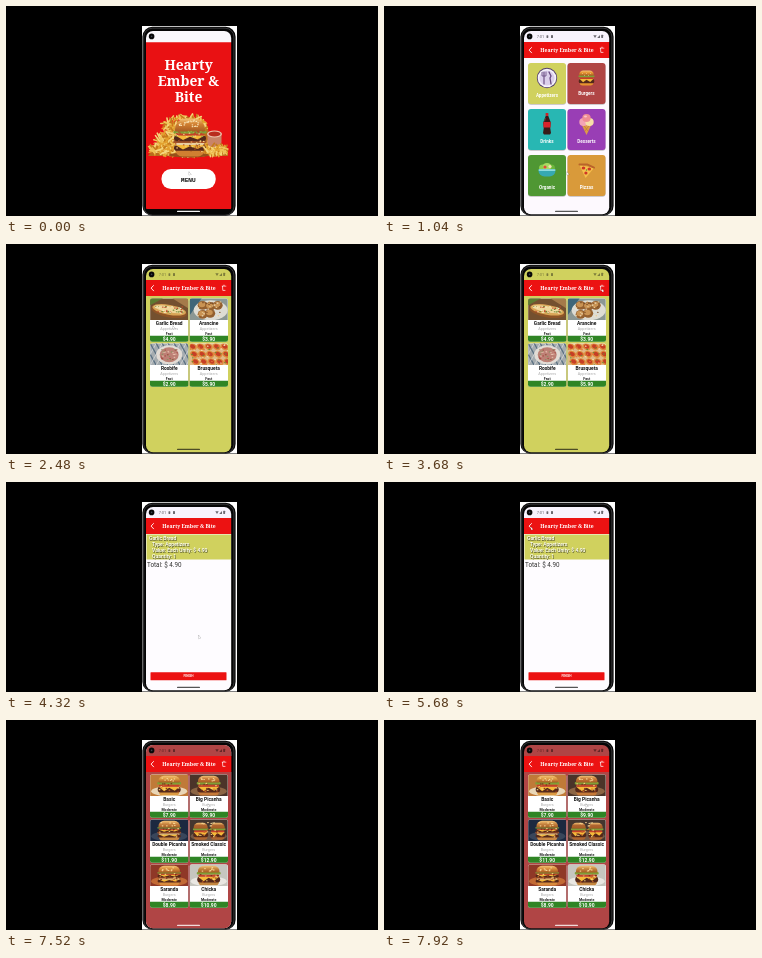
An HTML page with a canvas that plays this animation: 372 px wide and 210 px high, repeating every 8000 ms.

```html
<!DOCTYPE html>
<html lang="en">
<head>
<meta charset="utf-8">
<title>Food ordering app</title>
<style>
html, body { margin: 0; width: 100%; height: 100%; overflow: hidden; background: #000; }
canvas { display: block; width: 372px; height: 210px; }
</style>
</head>
<body>
<canvas id="stage"></canvas>
<script>
const W = 372, H = 210, LOOP = 8000, FADE = 180;
const SANS = 'Roboto, "Open Sans", sans-serif', SERIF = '"Noto Serif", serif';
const RED = '#ec1212', PAPER = '#fdf9fe', LIME = '#d0d15e', BRICK = '#b04545';
const scale = Math.max(1, window.devicePixelRatio || 1);
let g;

function sheet(canvas) {
  canvas.width = W * scale;
  canvas.height = H * scale;
  const ctx = canvas.getContext('2d');
  ctx.scale(scale, scale);
  return ctx;
}

function seeded(seed) {
  return () => (seed = (seed * 16807) % 2147483647) / 2147483647;
}

function rect(x, y, w, h, fill, r = 0) {
  g.fillStyle = fill;
  g.beginPath();
  g.roundRect(x, y, w, h, r);
  g.fill();
}

function oval(x, y, rx, ry, fill, turn = 0) {
  g.fillStyle = fill;
  g.beginPath();
  g.ellipse(x, y, rx, ry, turn, 0, Math.PI * 2);
  g.fill();
}

function poly(fill, ...p) {
  g.fillStyle = fill;
  g.beginPath();
  for (let i = 0; i < p.length; i += 2) g.lineTo(p[i], p[i + 1]);
  g.fill();
}

function line(color, width, ...p) {
  g.strokeStyle = color;
  g.lineWidth = width;
  g.lineCap = g.lineJoin = 'round';
  g.beginPath();
  for (let i = 0; i < p.length; i += 2) g.lineTo(p[i], p[i + 1]);
  g.stroke();
}

function text(s, x, y, size, color, weight = 400, family = SANS, align = 'center') {
  g.font = `${weight} ${size}px ${family}`;
  g.textAlign = align;
  g.fillStyle = color;
  g.fillText(s, x, y);
}

function clipped(x, y, w, h, r, draw) {
  g.save();
  g.beginPath();
  g.roundRect(x, y, w, h, r);
  g.clip();
  draw();
  g.restore();
}

function flecks(x, y, w, h, tones, count, seed) {
  const rnd = seeded(seed * 991);
  for (let i = 0; i < count; i++) oval(x + rnd() * w, y + rnd() * h, .9, .6, tones[i % tones.length]);
}

// x, y is the centre
function burger(x, y, w, h, bun = '#d98a35', stack = 1) {
  const l = x - w / 2, t = y - h / 2, top = h * .34, base = h * .16;
  const step = (h - top - base) / stack;
  rect(l + w * .06, t + h - base - 1, w * .88, base + 1, bun, [1, 1, base, base]);
  for (let i = stack - 1; i >= 0; i--) {
    const y0 = t + top + i * step;
    rect(l, y0 + step * .45, w, step * .58, '#54281a', step * .25);
    poly('#f4b93a', l + w * .03, y0 + step * .4, l + w * .97, y0 + step * .4, l + w * .74, y0 + step * .85,
      l + w * .5, y0 + step * .55, l + w * .28, y0 + step * .9);
    rect(l + w * .05, y0 + step * .2, w * .9, step * .24, i ? '#e8cfa2' : '#c5402a', 1);
    rect(l - w * .02, y0 - step * .05, w * 1.04, step * .26, i ? '#a4552b' : '#7f9f37', 1);
  }
  const shine = g.createLinearGradient(0, t, 0, t + top);
  shine.addColorStop(0, '#f3c274');
  shine.addColorStop(.45, bun);
  shine.addColorStop(1, '#a65b22');
  rect(l + w * .03, t, w * .94, top, shine, [top * .85, top * .85, 1, 1]);
}

function chips(x, y, rx, ry, count, seed) {
  const rnd = seeded(seed), tones = ['#e2a02e', '#efc258', '#c57a1c', '#f5d67c'];
  for (let i = 0; i < count; i++) {
    const a = rnd() * 6.28, d = Math.sqrt(rnd()), turn = rnd() * 3.14;
    const px = x + Math.cos(a) * d * rx, py = y + Math.sin(a) * d * ry;
    const dx = Math.cos(turn) * 3.6, dy = Math.sin(turn) * 3.6;
    line(tones[i % 4], 1.6, px - dx, py - dy, px + dx, py + dy);
  }
}

function statusBar(color, ink) {
  rect(140, 25, 86, 11.2, color);
  if (!ink) return;
  text('7:01', 156.5, 32, 4, ink);
  rect(162.5, 29.3, 1.8, 2.6, ink, .4);
  rect(167, 29, 2, 3, ink, .6);
  poly(ink, 209.3, 29.2, 212.7, 29.2, 211, 32);
  poly(ink, 213.2, 32, 216, 32, 216, 29);
  rect(217.2, 28.8, 1.9, 3.2, ink, .4);
}

function appBar(cart) {
  rect(140, 36, 86, 16, RED);
  line('#fff', .9, 147.6, 41.4, 145.1, 44.1, 147.6, 46.8);
  text('Hearty Ember & Bite', 183, 46, 5.1, '#fff', 600, SERIF);
  if (!cart) return;
  line('#fff', .6, 215.9, 42.2, 219.9, 42.2);
  line('#fff', .7, 219, 46.4, 216.8, 46.4, 216.5, 42.4);
  line('#fff', .5, 217.2, 41.3, 218.7, 41.3);
}

function handle(color) {
  rect(171, 204.8, 23, 1.2, color, .6);
}

function home() {
  rect(140, 25, 86, 184, '#e91113');
  statusBar('#faf8fc');
  ['Hearty', 'Ember &', 'Bite'].forEach((s, i) => text(s, 182.5, 64 + i * 16, 13.8, '#fff', 700, SERIF));
  poly('#b96d1c', 142, 150, 150, 140, 164, 122, 180, 110, 200, 116, 204, 130, 222, 143, 222, 150);
  chips(179, 119, 21, 9, 110, 9);
  chips(163, 135, 12, 9, 70, 71);
  chips(182, 143, 38, 6, 190, 27);
  oval(183, 149, 20, 2.5, '#94501a');
  burger(184, 131.5, 32, 38, '#d07f31', 2);
  flecks(173, 114, 21, 7, ['#f9e3b4'], 22, 5);
  flecks(168, 125, 32, 6, ['#93b544', '#c23b28', '#f0cf8c'], 26, 12);
  flecks(168, 133, 32, 13, ['#7a351c', '#f7d27b', '#b4491f'], 34, 6);
  rect(201.5, 128, 14, 13, '#c98468', [1, 1, 5, 5]);
  oval(208.5, 128, 7.5, 3.5, '#ecc4ae');
  oval(208.5, 128, 6, 2.5, '#b82c1e');
  chips(209, 144, 11, 4, 34, 44);
  rect(155.5, 163, 54.2, 20, '#fff', 9.5);
  text('MENU', 182.3, 175.6, 6, '#151515', 700, '"Noto Sans Mono", monospace');
  rect(140, 203, 86, 6, '#050505');
  handle('#f5f5f5');
}

const icons = [
  (x, y) => {
    oval(x, y, 10.2, 10.2, '#55406f');
    oval(x, y, 9.3, 9.3, '#f6f2fb');
    oval(x, y, 7.6, 7.6, '#dcd0ec');
    line('#65477f', 1.1, x - 3, y - 6, x - 3, y + 6);
    line('#65477f', .8, x - 5, y - 6, x - 5, y - 2, x - 1, y - 2, x - 1, y - 6);
    line('#65477f', 1.3, x + 2, y - 6, x + 4, y - 2, x + 3, y, x + 4, y + 6);
  },
  (x, y) => {
    burger(x, y, 15.5, 15, '#e8942f');
    for (let i = 0; i < 5; i++) oval(x - 4 + i * 2, y - 4.4 + (i % 2) * 1.6, .5, .35, '#fff0c4');
  },
  (x, y) => {
    rect(x - 1.4, y - 11, 2.8, 3, '#cf2328', .5);
    poly('#381b18', x - 1.3, y - 8, x + 1.3, y - 8, x + 3.8, y - 1.5, x + 3.2, y + 4, x + 4, y + 9, x + 3, y + 10.5, x - 3, y + 10.5, x - 4, y + 9, x - 3.2, y + 4, x - 3.8, y - 1.5);
    rect(x - 3.6, y - 2, 7.2, 5.5, '#d8242b');
    line('#8a5a52', .6, x - 1.6, y - 5.5, x - 2.4, y - 3);
  },
  (x, y) => {
    poly('#dd9b49', x - 5.2, y, x + 5.2, y, x, y + 11);
    line('#b8712c', .5, x - 3, y + 1, x + 1.5, y + 7);
    line('#b8712c', .5, x + 3, y + 1, x - 1.5, y + 7);
    oval(x - 3, y - 2, 4.2, 4, '#f3a4b5');
    oval(x + 3, y - 2, 4.2, 4, '#f6dfa8');
    oval(x, y - 6, 4.2, 4, '#ef8d94');
    oval(x - 1, y - 7.4, 1.5, 1, '#fbc5c8');
  },
  (x, y) => {
    oval(x - 4, y - 2, 4, 3.4, '#8fcf4b');
    oval(x + 4, y - 2, 4, 3.4, '#6cb83c');
    oval(x, y - 3.5, 4.2, 3.5, '#a9da62');
    oval(x - 2, y - 3, 1.6, 1.6, '#e34a3b');
    oval(x + 3, y - 3.5, 1.6, 1.6, '#f4e6b1');
    rect(x - 8.5, y - .7, 17, 7.2, '#36a9b2', [1, 1, 6, 6]);
    rect(x - 8.5, y - .7, 17, 1.6, '#8fdce0', .8);
  },
  (x, y) => {
    poly('#f5c04b', x - 7, y - 5, x + 7.5, y - 2, x - 1, y + 8);
    line('#b9642a', 2, x - 7, y - 5.6, x + 1, y - 5.4, x + 7.5, y - 2.4);
    oval(x - 3, y - 2, 1.8, 1.6, '#cf3526');
    oval(x + 2.8, y - 1, 1.8, 1.6, '#cf3526');
    oval(x - .6, y + 3, 1.6, 1.6, '#cf3526');
    oval(x, y, .7, .7, '#5d8e36');
  }
];

function menu() {
  rect(140, 25, 86, 184, PAPER);
  statusBar('#f8f3fd', '#6b6870');
  appBar(true);
  const tiles = [['Appetizers', LIME], ['Burgers', BRICK], ['Drinks', '#28b7b3'],
    ['Desserts', '#993eb5'], ['Organic', '#4f9733'], ['Pizzas', '#d99a3a']];
  tiles.forEach(([name, color], i) => {
    const x = 144 + (i % 2) * 39.5, y = 57 + (i >> 1) * 46;
    rect(x, y + .8, 38, 41, 'rgba(0,0,0,.25)', 3);
    rect(x, y, 38, 41, color, 3);
    icons[i](x + 19, y + 15);
    text(name, x + 19, y + (i === 1 ? 32 : 33.7), 4.6, '#fff', 700);
  });
  handle('#555');
}

const snacks = [
  (x, y) => {
    rect(x, y, 38, 22, '#74502f');
    poly('#5d7b31', x, y, x + 13, y, x, y + 7);
    poly('#a57a4a', x + 22, y, x + 38, y, x + 38, y + 10);
    oval(x + 19, y + 13, 18, 6, '#8f5426', .18);
    oval(x + 19, y + 11.5, 17, 5, '#d9a557', .18);
    oval(x + 19, y + 11, 15, 3, '#efd79a', .18);
    flecks(x + 5, y + 8, 28, 7, ['#6c8736', '#bd4b2c', '#f6e9c0'], 42, 3);
  },
  (x, y) => {
    rect(x, y, 38, 22, '#8b9794');
    poly('#3f6679', x, y, x + 12, y, x, y + 17);
    oval(x + 21, y + 12, 17, 10, '#dddcd4');
    for (let i = 0; i < 5; i++) {
      const px = x + 13 + (i % 3) * 7.5, py = y + 7 + (i > 2) * 8 + (i % 2);
      oval(px, py, 5, 4.4, '#94602f');
      oval(px - .8, py - .8, 3.3, 2.7, '#c99353');
    }
    flecks(x + 8, y + 3, 24, 15, ['#e5c38b', '#7a4a25', '#f0e4cb'], 26, 4);
  },
  (x, y) => {
    rect(x, y, 38, 22, '#a5acb0');
    for (let i = -2; i < 8; i++) {
      line('#5b7183', 1.3, x + i * 6, y, x + i * 6 + 12, y + 22);
      line('#d7dadb', .8, x + i * 6 + 12, y, x + i * 6, y + 22);
    }
    oval(x + 19, y + 11.5, 13, 9.5, '#e2dcd5');
    oval(x + 19, y + 11.5, 9.5, 7.5, '#bd8075');
    flecks(x + 11, y + 6, 16, 11, ['#a64c45', '#e6bdac', '#8a8f62'], 34, 8);
  },
  (x, y) => {
    rect(x, y, 38, 22, '#e0b987');
    for (let i = 0; i < 15; i++) {
      const px = x + 3 + (i % 5) * 8 + (i / 5 | 0) * 1.5, py = y + 3.5 + (i / 5 | 0) * 7.5;
      oval(px, py, 4.2, 3.2, '#dd8b3d', .5);
      oval(px, py - .3, 2.8, 2, '#c63e25', .5);
    }
    flecks(x, y, 38, 22, ['#f6dcae', '#6a8c32', '#e9723a'], 40, 15);
  }
];

const burgerShots = [['#c07a38', '#e9d6b6', '#dc9a42'], ['#4b3429', '#8c6544', '#c77a38'],
  ['#1c2940', '#39465b', '#c88743'], ['#44362f', '#735a49', '#ae6530'],
  ['#8f3827', '#c26a35', '#d88b3c'], ['#c6c6bf', '#e9e7e2', '#c4863e']]
  .map(([back, plate, bun], i) => (x, y) => {
    rect(x, y, 38, 22, back);
    oval(x + 19, y + 17, 18, 5, plate);
    if (i === 3) {
      burger(x + 11, y + 12, 15, 17, bun);
      burger(x + 28, y + 12, 15, 17, bun);
    } else burger(x + 19, y + 11.3, 23, 19.5, bun, 1 + (i === 2 || i === 4));
    flecks(x + 9, y + 9, 20, 9, ['#f1cf7c', '#7e2c18', '#c8652a'], 18, i + 2);
    flecks(x + 11, y + 3, 16, 4, ['#f6d695'], 8, i + 9);
  });

function dishes(bg, ink, foot, shots, kind, pace, rows) {
  rect(140, 25, 86, 184, bg);
  statusBar(bg, ink);
  appBar(true);
  rows.forEach(([name, price], i) => {
    const x = 144 + (i % 2) * 39.5, y = 54.3 + (i >> 1) * 45;
    rect(x, y + .6, 38.5, 43.2, 'rgba(0,0,0,.25)', 2.5);
    clipped(x, y, 38.5, 43.4, 2.5, () => {
      rect(x, y, 38.5, 44, '#fff');
      clipped(x, y, 38.5, 21.8, 0, () => shots[i](x + .2, y));
      text(name, x + 19.2, y + 26.8, 4.85, '#111', 700);
      text(kind, x + 19.2, y + 31.8, 3.8, '#aaa');
      text(pace, x + 19.2, y + 36.3, 3.6, '#222', 700);
      rect(x, y + 37.4, 38.5, 6.3, '#2f8525');
      text(price, x + 19.2, y + 42.4, 5, '#fff', 700);
    });
  });
  handle(foot);
}

const appetizers = () => dishes(LIME, '#7d7d3c', '#4d4d25', snacks, 'Appetizers', 'Fast', [
  ['Garlic Bread', '$4.90'], ['Arancine', '$3.90'], ['Rosbife', '$2.90'], ['Brusqueta', '$5.90']]);

const burgers = () => dishes(BRICK, '#652727', '#f0dada', burgerShots, 'Burgers', 'Moderate', [
  ['Basic', '$7.90'], ['Big Picanha', '$9.90'], ['Double Picanha', '$11.90'],
  ['Smoked Classic', '$12.90'], ['Saranda', '$8.90'], ['Chicka', '$10.90']]);

function cart() {
  rect(140, 25, 86, 184, '#fefcff');
  statusBar('#f8f3fd', '#6b6870');
  appBar(false);
  rect(140.5, 52.5, 85, 25, LIME);
  const rows = [['Garlic Bread', 143], ['Type: Appetizers', 146], ['Value: Each Unity: $ 4.90', 146], ['Quantity: 1', 146]];
  rows.forEach(([s, x], i) => {
    const y = 58.2 + i * 6;
    text(s, x + .5, y + .5, 5, '#55562c', 500, SANS, 'left');
    text(s, x, y, 5, '#fff', 500, SANS, 'left');
  });
  text('Total: $ 4.90', 141, 84.6, 6.3, '#333', 400, SANS, 'left');
  rect(144.5, 190.2, 76, 8, RED, .5);
  text('FINISH', 182.5, 195.4, 3.2, '#fff', 700);
  handle('#555');
}

function phone() {
  rect(136, 20, 95, 189.5, '#fff');
  rect(136.4, 20.8, 93.2, 189, '#050505', 10);
  g.strokeStyle = '#66666b';
  g.lineWidth = .5;
  g.beginPath();
  g.roundRect(137.7, 22.2, 90.2, 187, 8.8);
  g.stroke();
}

function prerender(draw) {
  const layer = document.createElement('canvas');
  g = sheet(layer);
  draw();
  return layer;
}

const [frameLayer, homeLayer, menuLayer, snackLayer, cartLayer, burgerLayer] =
  [phone, home, menu, appetizers, cart, burgers].map(prerender);

// [start time, page]
const route = [[-FADE, homeLayer], [470, menuLayer], [2300, snackLayer], [3905, cartLayer], [6065, menuLayer], [7345, burgerLayer]];
// [time, x, y]
const pointer = [[0, 183, 166], [1360, 183, 166], [1760, 167, 82], [3040, 167, 82], [3360, 218, 45],
  [4000, 218, 45], [4480, 184, 191], [4800, 184, 191], [5600, 147, 45], [6480, 148, 46],
  [6800, 173, 82], [6960, 173, 82], [7200, 202, 84], [LOOP, 202, 84]];
const ease = p => p * p * (3 - 2 * p);

function cursor(t) {
  const i = pointer.findIndex((p, n) => n && t <= p[0]);
  const [t0, x0, y0] = pointer[i - 1], [t1, x1, y1] = pointer[i];
  const p = ease((t - t0) / (t1 - t0)), x = x0 + (x1 - x0) * p, y = y0 + (y1 - y0) * p;
  const tip = [x, y, x, y + 3.2, x + .9, y + 2.5, x + 2.2, y + 2.4, x, y];
  line('rgba(40,40,40,.5)', .5, ...tip);
  poly('rgba(255,255,255,.9)', ...tip);
}

const ctx = sheet(document.getElementById('stage'));

function frame(now) {
  const t = now % LOOP;
  g = ctx;
  rect(0, 0, W, H, '#000');
  g.drawImage(frameLayer, 0, 0, W, H);
  clipped(140, 25, 85.2, 183.3, 7, () => {
    const n = route.filter(r => r[0] <= t).length - 1;
    const p = Math.min(1, (t - route[n][0]) / FADE);
    if (p < 1) g.drawImage(route[n - 1][1], 0, 0, W, H);
    g.globalAlpha = ease(p);
    g.drawImage(route[n][1], 0, 0, W, H);
    g.globalAlpha = 1;
    cursor(t);
  });
  oval(145.6, 30.4, 2.8, 2.8, '#080808');
  oval(145.6, 30.4, .8, .8, '#3c4250');
}

function tick() {
  frame(performance.now());
  requestAnimationFrame(tick);
}
tick();
</script>
</body>
</html>
```
